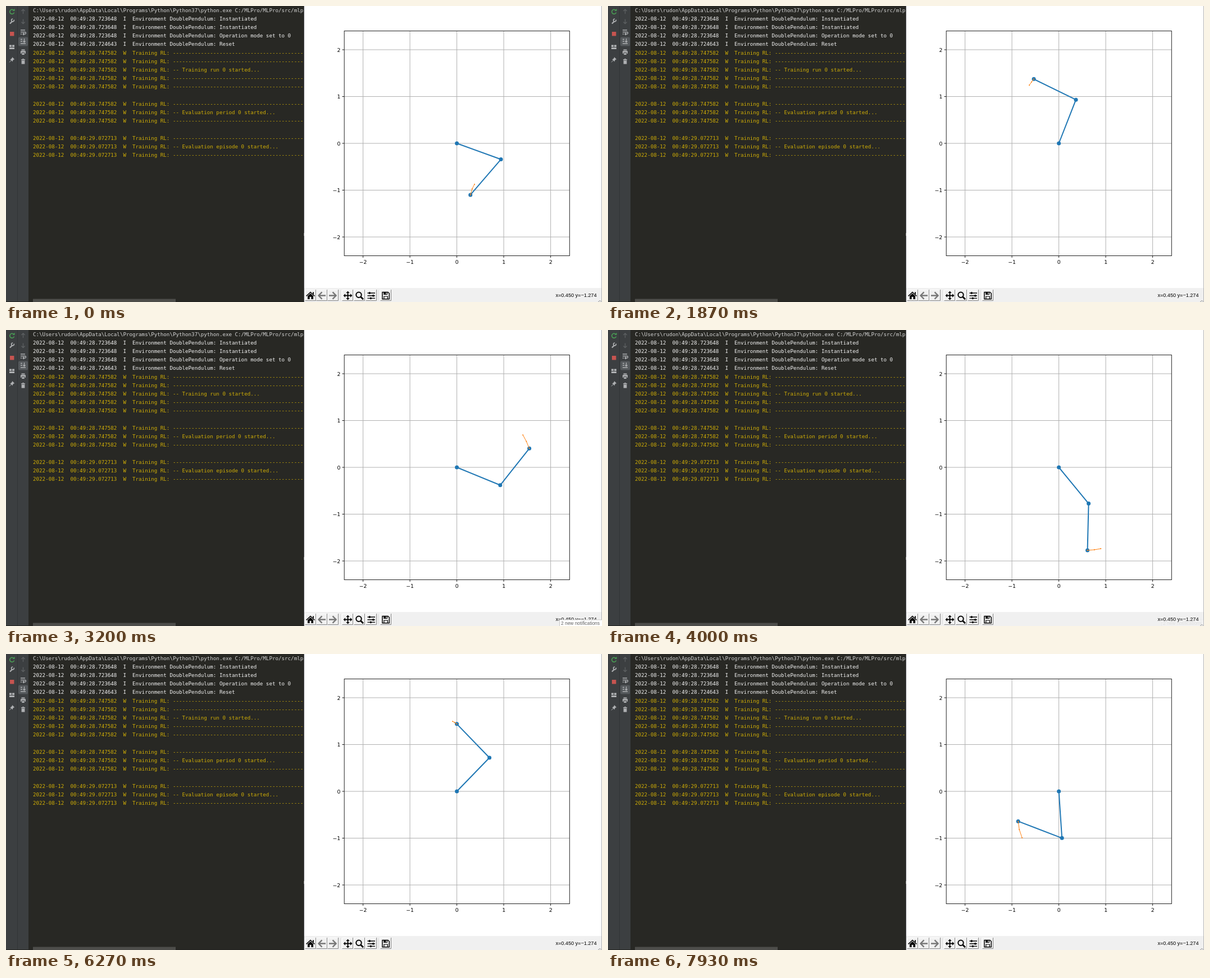
Animation of 1061 by 528 pixels, one loop 8 s. Source, as an HTML page:

```html
<!DOCTYPE html>
<html lang="en">
<head>
<meta charset="utf-8">
<title>Double pendulum training</title>
<style>
  html, body { margin: 0; width: 100%; height: 100%; overflow: hidden; background: #fff; }
  svg { display: block; width: 1061px; height: 528px; }
  .log { font: 9.2px "DejaVu Sans Mono", monospace; }
  .tick { font: 9.3px "DejaVu Sans", sans-serif; fill: #000; }
  .status { font: 9.1px "Liberation Sans", sans-serif; fill: #000; }
  .tip { font: 8.4px "Liberation Sans", sans-serif; fill: #606060; }
  .line { fill: none; stroke: #afb1b3; stroke-width: 1.3; }
  .dim { fill: none; stroke: #5d6062; stroke-width: 1.3; }
</style>
</head>
<body>
<svg viewBox="0 0 1061 528">
  <defs><clipPath id="pane"><rect x="40" width="489" height="528"/></clipPath></defs>

  <!-- console -->
  <rect width="530" height="528" fill="#282824"/>
  <rect width="40" height="528" fill="#3c3f41"/>
  <path d="M20.5 0V528" stroke="#323537"/>
  <rect x="48" y="522.5" width="254" height="5.5" fill="#4d4d4a"/>
  <path d="M0 527.5H48M302 527.5H530" stroke="#222320"/>
  <path d="M530.5 0V528" stroke="#55565a"/>
  <path d="M530.5 405V410" stroke="#999"/>
  <g id="log" class="log" clip-path="url(#pane)"></g>

  <!-- console tool strips -->
  <g>
    <path d="M14.2 8.2A4 4 0 1 0 14.6 11.5" fill="none" stroke="#499c54" stroke-width="1.6"/>
    <path d="M11.5 8.8H15.6V4.8Z" fill="#499c54"/>
    <path d="M7 31.5L11.5 27" stroke="#afb1b3" stroke-width="2.2"/>
    <path d="M14.2 24.5A2.4 2.4 0 1 1 12.2 23" fill="none" stroke="#afb1b3" stroke-width="1.7"/>
    <rect x="7" y="46" width="7.4" height="7.4" fill="#c75450"/>
    <path d="M6 69.5H10V73H6ZM11 69.5H15V73H11ZM6 74H15V77H6Z" fill="#afb1b3"/>
    <path d="M11 91L15.3 95.3L13.6 95.6L11.8 97.8L11.7 99.4L7.2 95L8.8 94.8L10.8 92.8Z" fill="#afb1b3"/>
    <path d="M9 97.2L6 100.4" stroke="#afb1b3"/>
    <path class="dim" d="M30.5 14V6M27.4 9L30.5 6L33.6 9M30.5 23.5V31.5M27.4 28.5L30.5 31.5L33.6 28.5"/>
    <path class="line" d="M26 43H34M26 46.5H33.5Q35.5 46.5 35.5 48.3T33.5 50H30.5M32 48L30 50L32 52M26 50H28"/>
    <rect x="22" y="55.5" width="17" height="16" rx="2" fill="#55595c"/>
    <path class="line" d="M26 59.5H29M26 63H29M26 67H35M32.5 58V64.5M30.5 62.5L32.5 64.7L34.5 62.5"/>
    <path d="M27.5 77.5H33.5V79.5H27.5ZM26 80.3H35V85H33.5V83H27.5V85H26ZM28.3 84H32.7V87H28.3Z" fill="#afb1b3"/>
    <path d="M27 95H34V96.5H27ZM29.2 94H31.8V95H29.2ZM27.6 97.3H33.4V103.5H27.6Z" fill="#afb1b3"/>
  </g>

  <!-- figure -->
  <rect x="531" width="530" height="528" fill="#fff"/>
  <g id="axes"></g>
  <rect x="602.2" y="44.5" width="401.1" height="401" fill="none" stroke="#222"/>
  <path id="rod" fill="none" stroke="#1f77b4" stroke-width="2" stroke-linejoin="round"/>
  <g id="dots" fill="#1f77b4"></g>
  <path id="trail" fill="none" stroke="#ff7f0e"/>
  <g id="specks" fill="#ff7f0e"></g>

  <!-- figure toolbar -->
  <rect x="531" y="503" width="530" height="25" fill="#f0f0f0"/>
  <path d="M1060.5 0V528" stroke="#b4b4b4"/>
  <g id="buttons" fill="none"></g>
  <path d="M595 507V525M662.5 507V525" stroke="#dcdcdc"/>
  <g stroke-linejoin="round">
    <path d="M534.5 517.5L542 510.5L549.5 517.5" fill="none" stroke="#000" stroke-width="1.7"/>
    <path d="M546 510.5H548V514.5L546 512.8ZM537 517.3L542 512.8L547 517.3V523H543.4V518.8H540.6V523H537Z"/>
    <path d="M569 516.5H556.5M562.5 510.3L556.3 516.5L562.5 522.7" fill="none" stroke="#777" stroke-width="2.4"/>
    <path d="M575 516.5H587.5M581.5 510.3L587.7 516.5L581.5 522.7" fill="none" stroke="#777" stroke-width="2.4"/>
    <path d="M608.5 510V523M602 516.5H615" stroke="#000" stroke-width="1.8"/>
    <path d="M608.5 508.5L611.7 512H605.3ZM608.5 524.5L611.7 521H605.3ZM600.5 516.5L604 513.3V519.7ZM616.5 516.5L613 513.3V519.7Z"/>
    <circle cx="628" cy="515.2" r="4.7" fill="none" stroke="#000" stroke-width="2"/>
    <path d="M631.5 518.7L636 523.2" stroke="#000" stroke-width="2.8"/>
    <path d="M643.5 512H657M643.5 516.7H657M643.5 521.4H657" stroke="#000" stroke-width="1.4"/>
    <path d="M646 510.3H648.6V513.7H646ZM652.5 515H655.1V518.4H652.5ZM648 519.7H650.6V523.1H648Z"/>
    <path d="M670 510.5H680L682.3 512.8V522.8H670Z" fill="none" stroke="#000" stroke-width="1.5"/>
    <path d="M672.3 510.5H679V515H672.3ZM672.3 517.5H680V522.8H672.3Z"/>
    <path d="M676.2 511.2H677.8V514H676.2ZM673.5 518.6H678.8V522H673.5Z" fill="#f0f0f0"/>
  </g>
  <text class="status" x="1051.5" y="519" text-anchor="end">x=0.450 y=−1.274</text>
  <path d="M1054 528L1057 525.5L1059.5 527" fill="none" stroke="#777" stroke-width=".8"/>
  <g id="tip">
    <rect x="985.5" y="517" width="76" height="12" fill="#fff" stroke="#c8c8c8"/>
    <text class="tip" x="988" y="526">2 new notifications</text>
  </g>
</svg>
<script>
const $ = id => document.getElementById(id);
const add = (parent, tag, attrs, text) => {
  const el = document.createElementNS("http://www.w3.org/2000/svg", tag);
  for (const k in attrs) el.setAttribute(k, attrs[k]);
  if (text) el.textContent = text;
  return parent.appendChild(el);
};

// Console lines: time, level, message
const dashes = "-".repeat(60);
const info = (t, s) => ["00:49:28." + t, "I", "Environment DoublePendulum: " + s];
const warn = (t, s = dashes) => ["00:49:" + t, "W", "Training RL: " + s];
const A = "28.747582", B = "29.072713";
const log = [
  info("723648", "Instantiated"), info("723648", "Instantiated"),
  info("723648", "Operation mode set to 0"), info("724643", "Reset"),
  warn(A), warn(A), warn(A, "-- Training run 0 started..."), warn(A), warn(A),
  null,
  warn(A), warn(A, "-- Evaluation period 0 started..."), warn(A),
  null,
  warn(B), warn(B, "-- Evaluation episode 0 started..."), warn(B)
];
const print = (row, text, fill) =>
  add($("log"), "text", { x: 48, y: 10.6 + row * 15.2, fill }, text.replace(/ /g, "\u00a0"));
print(0, "C:\\Users\\rudon\\AppData\\Local\\Programs\\Python\\Python37\\python.exe C:/MLPro/MLPro/src/mlpro", "#d6d6d6");
log.forEach((l, i) => l &&
  print(i + 1, "2022-08-12  " + l.join("  "), l[1] === "I" ? "#f4f4f4" : "#d0ae06"));

// Plot frame
const X0 = 802.6, Y0 = 245, UNIT = 83.5;
for (let v = -2; v <= 2; v++) {
  const x = X0 + v * UNIT, y = Y0 - v * UNIT, label = String(v).replace("-", "−");
  add($("axes"), "path", { d: `M${x} 44.5V445.5M602 ${y}H1003`, stroke: "#b0b0b0" });
  add($("axes"), "path", { d: `M${x} 445.5v3.5M602 ${y}h-3.5`, stroke: "#000", "stroke-width": .9 });
  add($("axes"), "text", { class: "tick", x, y: 459.5, "text-anchor": "middle" }, label);
  add($("axes"), "text", { class: "tick", x: 595.3, y: y + 3.5, "text-anchor": "end" }, label);
}
for (const x of [532, 552, 572, 598, 619, 640, 666]) {
  add($("buttons"), "path", { d: `M${x + .5} 525V506.5H${x + 19}`, stroke: "#fff" });
  add($("buttons"), "path", { d: `M${x + .5} 525.5H${x + 19.5}V506`, stroke: "#858585" });
}
const dots = [0, 1, 2].map(() => add($("dots"), "circle", { r: 3.5 }));
const specks = [0, 1, 2].map(() => add($("specks"), "circle", { r: 1 }));

// Key poses: redraw count, upper and lower arm angle (degrees from straight down)
const keys = [
  [-1, 92, -36], [0, 70, -40.6], [3, -3, -12], [5, -66, 25], [9, -152.5, -17.7],
  [13, -192, -88], [17, -207.5, -138], [21, -221.6, -157], [25, -250, -169],
  [30, -320, -256], [32, -330, -289], [35, -320.6, -361.4], [37, -346.5, -408],
  [39, -391, -428], [42, -461, -407], [44, -496.5, -420.2], [46, -517, -452],
  [50, -543, -484], [56, -584, -496], [60, -637, -499], [64, -670, -390],
  [67, -708, -357], [69, -705, -437], [70, -716.2, -471]
];

// Smooth curve through the key poses
const slope = (i, c) => {
  const a = keys[Math.max(i - 1, 0)], b = keys[Math.min(i + 1, keys.length - 1)];
  return (b[c] - a[c]) / (b[0] - a[0]);
};
function angle(n, c) {
  let i = 0;
  while (i < keys.length - 2 && keys[i + 1][0] <= n) i++;
  const [a, b] = [keys[i], keys[i + 1]], h = b[0] - a[0], u = (n - a[0]) / h, v = 1 - u;
  return (v * v * (1 + 2 * u) * a[c] + u * u * (3 - 2 * u) * b[c] +
    h * u * v * (v * slope(i, c) - u * slope(i + 1, c))) * Math.PI / 180;
}
function pose(n) {
  const p = angle(n, 1), q = angle(n, 2);
  const x = X0 + UNIT * Math.sin(p), y = Y0 + UNIT * Math.cos(p);
  return [[X0, Y0], [x, y], [x + UNIT * Math.sin(q), y + UNIT * Math.cos(q)]];
}

const path = pts => "M" + pts.map(p => p.map(v => v.toFixed(2)).join(" ")).join("L");
const place = (circles, pts) => circles.forEach((c, i) => {
  c.setAttribute("cx", pts[i][0]);
  c.setAttribute("cy", pts[i][1]);
});
const clamp = v => Math.max(0, Math.min(1, v));

// The plot redraws a little slower, then faster, than 0.59 times per 1/15 s
const redraws = slot => Math.round(.59 * slot - .2 - .9 * Math.sin(slot * Math.PI / 60));

function draw(t) {
  const slot = Math.floor((t + 5) * .015), n = redraws(slot);
  const arm = pose(n), tail = [n - 2 / 3, n - 1 / 3, n].map(m => pose(m)[2]);
  $("rod").setAttribute("d", path(arm));
  place(dots, arm);
  $("trail").setAttribute("d", path(tail));
  place(specks, tail);
  $("tip").setAttribute("opacity", Math.min(clamp((slot - 34) / 3), clamp((60.2 - slot) / 2)));
}

const start = performance.now();
(function tick() {
  draw(Math.min((performance.now() - start) % 8000, 7990));
  requestAnimationFrame(tick);
})();
</script>
</body>
</html>
```
